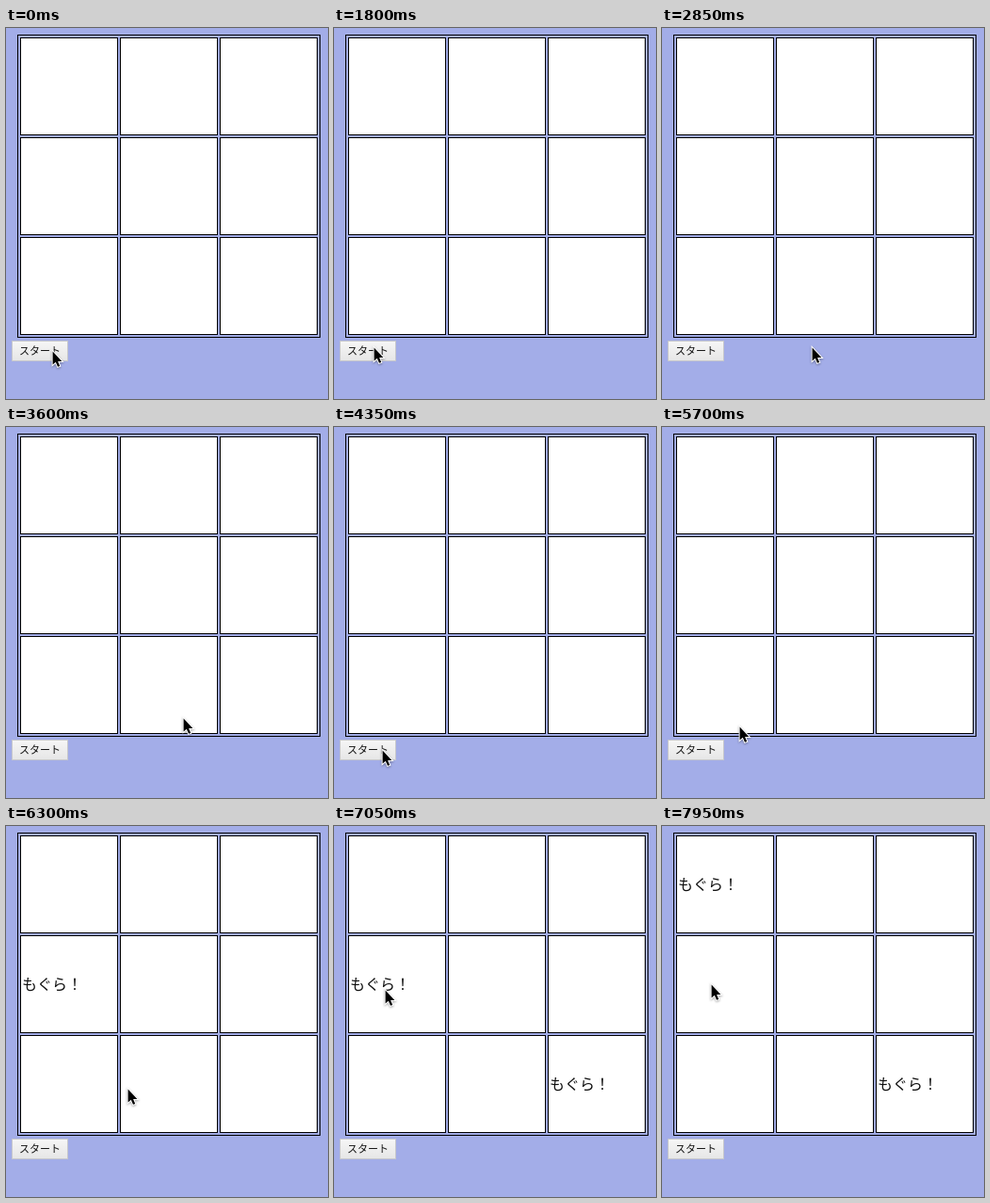
These frames come from a looping animation (342x394 px, 8000 ms). An HTML page:

```html
<!DOCTYPE html>
<html lang="ja">
<head>
<meta charset="utf-8">
<title>もぐらたたき</title>
<style>
  html, body { margin: 0; width: 100%; height: 100%; overflow: hidden; background: #a3ade8; }
  svg { display: block; }
  text { font-family: "Noto Sans CJK JP", "Noto Sans CJK", sans-serif; font-weight: 300; fill: #111; }
  .mole { font-size: 16px; }
  .label { font-size: 11px; }
  #arrow { filter: drop-shadow(0 1px 1px rgba(0, 0, 0, .35)); }
</style>
</head>
<body>
<svg width="342" height="394" viewBox="0 0 342 394">
  <defs>
    <linearGradient id="up" x2="0" y2="1">
      <stop offset="0" stop-color="#f6f6f6"/>
      <stop offset="1" stop-color="#e6e6e6"/>
    </linearGradient>
    <linearGradient id="down" x2="0" y2="1">
      <stop offset="0" stop-color="#dcdcdc"/>
      <stop offset="1" stop-color="#cfcfcf"/>
    </linearGradient>
  </defs>
  <rect x="12.5" y="7.5" width="321" height="321" fill="none" stroke="#000"/>
  <g id="cells" fill="#fff" stroke="#000"></g>
  <g id="moles"></g>
  <rect id="button" x="6.5" y="332.5" width="59" height="21" fill="url(#up)" stroke="#c6c7cc"/>
  <text class="label" x="14" y="347">スタート</text>
  <g id="arrow">
    <path d="M-.4 -.5V13.6L2.8 10.7L5 15.8L7.2 14.9L5.1 9.9H9.4Z" fill="#000" stroke="#fff" stroke-width="2" paint-order="stroke"/>
  </g>
  <path id="beam" d="M-3 -8.5Q0 -8.5 0 -6.5Q0 -8.5 3 -8.5M0 -6.5V6.5M-3 8.5Q0 8.5 0 6.5Q0 8.5 3 8.5M-1.5 3.5H1.5" fill="none" stroke="#000"/>
</svg>
<script>
const LOOP = 8000, TICK = 150, PITCH = 106;
const NS = "http://www.w3.org/2000/svg";
const $ = id => document.getElementById(id);

// Pointer moves: first tick, last tick, end x, end y
const home = [50, 344];
const moves = [
  [0, 1, 41, 341], [11, 12, 43, 340], [12, 18, 153, 341], [18, 19, 160, 340],
  [19, 24, 189, 310], [25, 29, 52, 344], [35, 42, 130, 280],
  [42, 48, 49.5, 167], [49, 50, 50.5, 167], [52, 53, 53, 169]
];
const press = 4800, release = 4950;
const beamFrom = 7200, beamTo = 7950;

// One mole per second after the click, each up for a fixed time
const firstMole = 5850, gap = 1000, stay = 1950;
const holes = [3, 8, 0];

function add(parent, tag, attrs) {
  const el = document.createElementNS(NS, tag);
  for (const key in attrs) el.setAttribute(key, attrs[key]);
  return parent.appendChild(el);
}

const cellX = i => PITCH * (i % 3);
const cellY = i => PITCH * Math.floor(i / 3);
const during = (t, from, to) => t >= from && t < to;
const show = (el, on) => el.setAttribute("visibility", on ? "visible" : "hidden");

function pointerAt(tick) {
  let [x, y] = home;
  for (const [from, to, endX, endY] of moves) {
    const s = Math.min(1, Math.max(0, (tick - from) / (to - from)));
    const e = s * s * (3 - 2 * s);
    x += (endX - x) * e;
    y += (endY - y) * e;
  }
  return [x, y];
}

for (let i = 0; i < 9; i++) {
  add($("cells"), "rect", { x: 15.5 + cellX(i), y: 10.5 + cellY(i), width: 103, height: 103 });
}

const moles = holes.map(i => {
  const el = add($("moles"), "text", { class: "mole", x: 17 + cellX(i), y: 68 + cellY(i) });
  el.textContent = "もぐら！";
  return el;
});

function draw() {
  const tick = Math.floor(performance.now() % LOOP / TICK);
  const t = tick * TICK;
  const beam = during(t, beamFrom, beamTo);
  const tip = pointerAt(tick);
  const pos = beam ? tip : tip.map(Math.round);
  for (const id of ["arrow", "beam"]) $(id).setAttribute("transform", `translate(${pos})`);
  show($("arrow"), !beam);
  show($("beam"), beam);
  $("button").setAttribute("fill", during(t, press, release) ? "url(#down)" : "url(#up)");
  moles.forEach((el, i) => {
    const up = firstMole + i * gap;
    show(el, during(t, up, up + stay));
  });
  requestAnimationFrame(draw);
}
draw();
</script>
</body>
</html>
```
